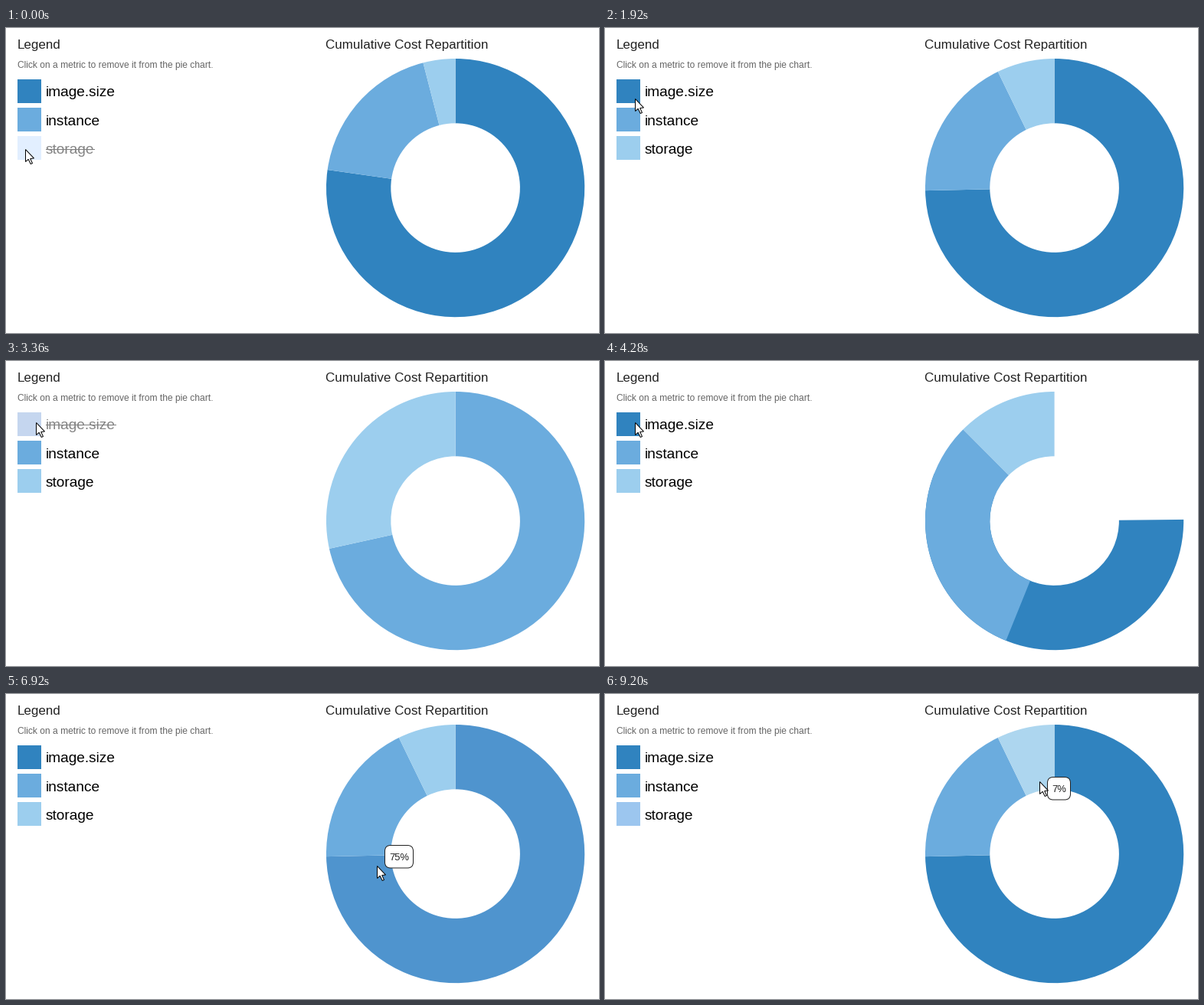
A matplotlib script that plays this animation: 774 by 398 pixels, repeating every 9.24 s.

```python
import matplotlib.pyplot as plt
from matplotlib.animation import FuncAnimation
from matplotlib.patches import FancyBboxPatch, Polygon, Rectangle, Wedge

W, H, DPI = 774, 398, 100
STEP, LOOP = 40, 9240
PX = 72 / DPI

CX, CY, R = 586.6, 208.6, 168.6
A1, A2 = 268.8, 334.05          # resting slice boundaries, clockwise from the top
DUR = 750                       # pie transition

BASE = ["#3083bf", "#6bacde", "#9cceee"]
HOVER = ["#4f94ce", "#84bcde", "#add6ef"]
FADED = ["#c5d6ef", "#cfe4f6", "#e2efff"]
NAMES = ["image.size", "instance", "storage"]
TEXT_W = [92, 71.5, 64]
ROWS = [(67, 89), (104, 127), (141, 164)]   # swatch top, text baseline

# slice, time removed, time restored
TOGGLES = [(2, -360, 1034), (0, 2385, 3827)]

# slice, start, end, label, box left, top, width
HOVERS = [
    (1, 5430, 6540, "18%", 440.5, 138.5, 37),
    (0, 6540, 7930, "75%", 494.5, 197.5, 37),
    (2, 8670, LOOP, "7%", 577.5, 108.5, 30),
]

# time, x, y of the pointer tip
PATH = [
    (0, 25, 158), (1300, 25, 158), (2150, 42, 77), (2900, 42, 77),
    (3500, 39, 80), (4700, 39, 80), (5640, 481, 161), (6000, 481, 161),
    (6750, 484, 224), (7700, 484, 224), (8300, 540, 190), (8800, 567, 114),
    (LOOP, 567, 114),
]
ARROW = [(0, 0), (0, 16), (3.7, 12.8), (6.7, 19), (9, 18), (6.2, 12), (11, 11.5)]


def clamp(u):
    return min(1, max(0, u))


def cubic(u):
    u = clamp(u)
    return 4 * u ** 3 if u < 0.5 else 1 - 4 * (1 - u) ** 3


def removed(part, t):
    """How far a slice has been taken out of the pie, 0 to 1."""
    return sum(cubic((t - off) / DUR) - cubic((t - on) / DUR)
               for p, off, on in TOGGLES if p == part)


def struck(part, t):
    return any(p == part and off <= t < on for p, off, on in TOGGLES)


def pointer(t):
    for (t0, x0, y0), (t1, x1, y1) in zip(PATH, PATH[1:]):
        if t <= t1:
            u = (t - t0) / (t1 - t0)
            u = u * u * (3 - 2 * u)
            return round(x0 + (x1 - x0) * u), round(y0 + (y1 - y0) * u)


def slices(t):
    qi, qs = removed(0, t), removed(2, t)
    if qi > 0:
        full = 360 * (A2 - A1) / (360 - A1)
        start = A1 * (1 - qi)
        end = A2 + (full - A2) * qi
        return [(360 * qi, A1 + (360 - A1) * qi), (start, end), (end, 360)]
    start = A1 + (360 * A1 / A2 - A1) * qs
    end = A2 + (360 - A2) * qs
    return [(0, start), (start, end), (end, 360)]


fig = plt.figure(figsize=(W / DPI, H / DPI), dpi=DPI, facecolor="white")
ax = fig.add_axes([0, 0, 1, 1])
ax.set_xlim(0, W)
ax.set_ylim(H, 0)
ax.axis("off")


def label(x, y, s, size, color, z=2):
    return ax.text(x, y, s, fontsize=size * PX, color=color, zorder=z,
                   family="Liberation Sans", ha="left", va="baseline")


label(15, 27, "Legend", 17, "#222222")
label(417, 27, "Cumulative Cost Repartition", 17, "#222222")
label(15, 52, "Click on a metric to remove it from the pie chart.", 12, "#666666")

swatches, texts, strikes = [], [], []
for name, width, (top, base) in zip(NAMES, TEXT_W, ROWS):
    swatches.append(ax.add_patch(Rectangle((15, top), 30.5, 30.5, lw=0)))
    texts.append(label(52, base, name, 19.2, "black"))
    strikes.append(ax.add_patch(
        Rectangle((52, base - 6), width, 1.4, lw=0, color="#808080", zorder=3)))

wedges = [ax.add_patch(Wedge((CX, CY), R, 0, 90, width=R / 2, lw=0, zorder=2 + i / 10))
          for i in range(3)]

tip_box = ax.add_patch(FancyBboxPatch(
    (0, 0), 37, 29.5, boxstyle="round,pad=0,rounding_size=7.5",
    fc="white", ec="#222222", lw=PX, zorder=5))
tip_text = label(0, 0, "", 13, "#222222", 6)
arrow = ax.add_patch(Polygon(ARROW, closed=True, fc="white", ec="black",
                             lw=PX, joinstyle="miter", zorder=8))


def draw(n):
    t = n * STEP
    hover = next((h for h in HOVERS if h[1] <= t < h[2]), None)
    over = hover[0] if hover else None

    colors = list(BASE)
    if over == 1:
        colors[1:] = ["#64a5df", "#94ceee"]
    elif over == 2 or 1034 <= t < 1700:
        colors[2] = "#9cc6ef"

    for i, (a, b) in enumerate(slices(t)):
        off = struck(i, t)
        swatches[i].set_facecolor(FADED[i] if off else colors[i])
        texts[i].set_color("#848484" if off else "black")
        strikes[i].set_visible(off)
        wedges[i].set_visible(b - a > 0.02)
        wedges[i].set_theta1(a - 90)
        wedges[i].set_theta2(b - 90)
        wedges[i].set_facecolor(HOVER[i] if over == i else colors[i])

    tip_box.set_visible(hover is not None)
    tip_text.set_visible(hover is not None)
    if hover:
        _, _, _, text, x, y, width = hover
        tip_box.set_bounds(x, y, width, 29.5)
        tip_text.set_text(text)
        tip_text.set_position((x + 5.5, y + 19.5))

    px, py = pointer(t)
    arrow.set_xy([(px + 0.5 + x, py + 0.5 + y) for x, y in ARROW])
    return [*swatches, *texts, *strikes, *wedges, tip_box, tip_text, arrow]


anim = FuncAnimation(fig, draw, frames=LOOP // STEP, interval=STEP,
                     init_func=lambda: draw(0), repeat=True, repeat_delay=0)
plt.show()
```
